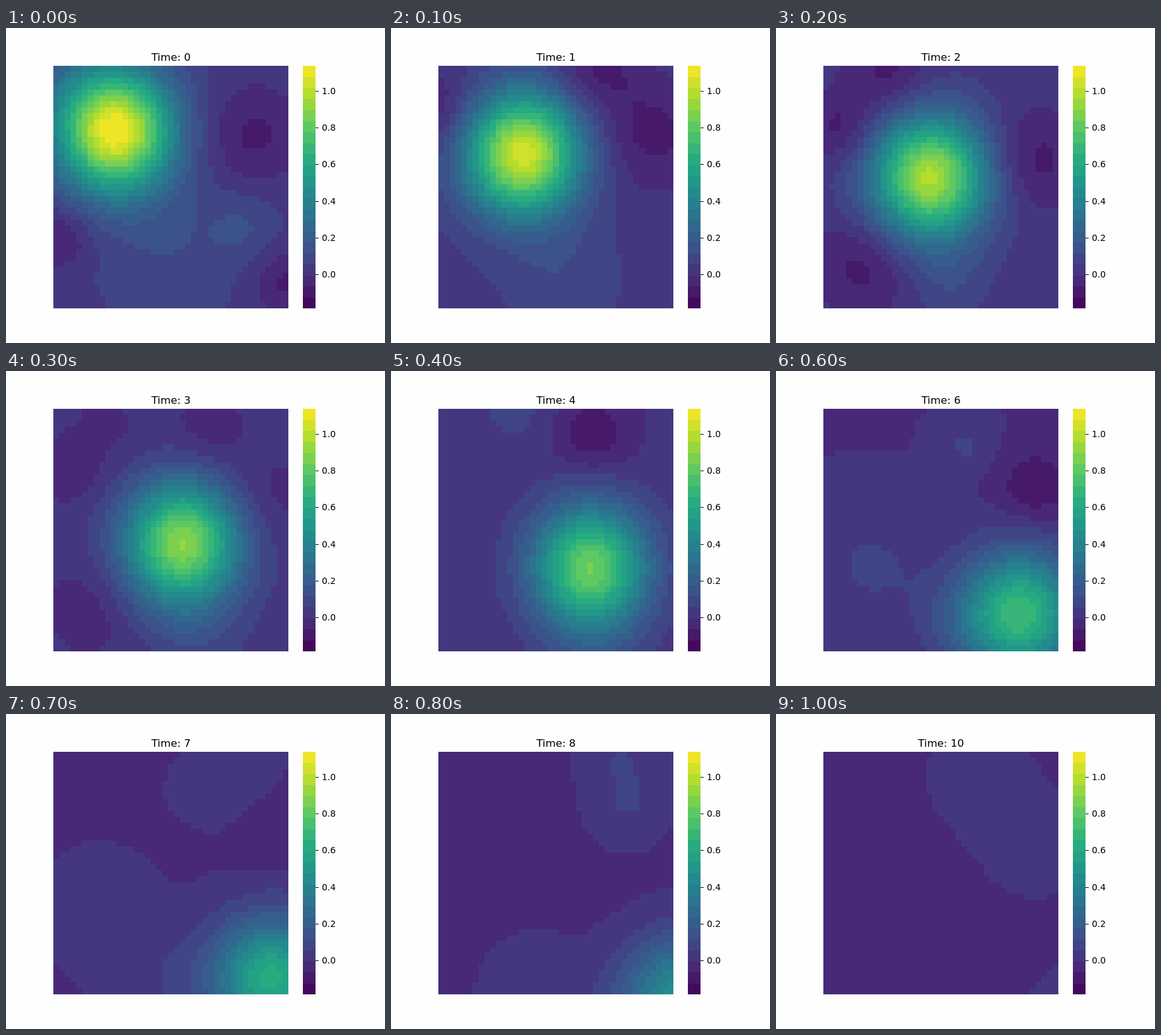
These frames come from a looping animation (600x500 px, 1100 ms). An HTML page with a canvas:

```html
<!DOCTYPE html>
<html lang="en">
<head>
<meta charset="utf-8">
<title>Heat map over time</title>
<style>
  html, body { margin: 0; width: 100%; height: 100%; overflow: hidden; background: #fefefe; }
  canvas, svg { position: absolute; left: 0; top: 0; display: block; }
  text { font-family: "DejaVu Sans", sans-serif; font-size: 13.89px; fill: #000; }
  #title { font-size: 16.67px; text-anchor: middle; }
</style>
</head>
<body>
<canvas id="map" width="600" height="500"></canvas>
<svg id="chart" width="600" height="500" viewBox="0 0 600 500">
  <text id="title" x="261.3" y="51.5">Time: 0</text>
</svg>
<script>
const STEP_MS = 100, STEPS = 11, CELLS = 41, BANDS = 22;
const PLOT = { x: 75, y: 60, w: 372, h: 385 };
const BAR = { x: 470, w: 20 };

const ctx = document.getElementById("map").getContext("2d");
const chart = document.getElementById("chart");
const title = document.getElementById("title");

// Viridis at even spacing, cut into flat bands.
const VIRIDIS = "440154 472d7b 3b528b 2c728e 21918c 28ae80 5ec962 addc30 fde725"
  .split(" ").map(hex => [0, 2, 4].map(i => parseInt(hex.slice(i, i + 2), 16)));

function viridis(u) {
  const pos = u * (VIRIDIS.length - 1);
  const i = Math.floor(pos);
  const mix = VIRIDIS[i].map((c, k) => Math.round(c + (VIRIDIS[i + 1][k] - c) * (pos - i)));
  return `rgb(${mix})`;
}

const bandColors = Array.from({ length: BANDS }, (_, i) => viridis((i + .5) / BANDS));

const valueToY = v => 391.3 - 291.4 * v;

function colorOf(value) {
  const band = Math.floor((PLOT.y + PLOT.h - valueToY(value)) / PLOT.h * BANDS);
  return bandColors[Math.max(0, Math.min(BANDS - 1, band))];
}

const bump = (x, y, cx, cy, rx, ry = rx) =>
  Math.exp(-(((x - cx) / rx) ** 2) - ((y - cy) / ry) ** 2);

// The hot spot drifts diagonally and cools exponentially.
const hotSpot = (step, x, y) =>
  1.1 * Math.exp(-.072 * step) * bump(x, y, 173 + 35.6 * step, 163 + 37 * step, 89, 95);

// Key spots [x, y, radius] of the slowly cooling background; steps between are blended.
const WARM = .07, COOL = -.12;
const SPOTS = {
  0: { warm: [[85, 85, 75], [260, 350, 110], [375, 315, 55]],
       cool: [[85, 330, 50], [390, 170, 80], [440, 405, 50]] },
  1: { warm: [[270, 400, 90]],
       cool: [[75, 130, 65], [325, 70, 65], [410, 170, 85]] },
  2: { warm: [[275, 400, 60]],
       cool: [[180, 75, 65], [105, 160, 55], [405, 210, 75], [140, 375, 75]] },
  4: { warm: [[195, 60, 60], [320, 430, 75]], cool: [[320, 100, 60]] },
  6: { warm: [[150, 310, 90], [285, 400, 70], [300, 120, 40]], cool: [[410, 185, 55]] },
  8: { warm: [[365, 60, 65], [375, 150, 60], [230, 440, 80]], cool: [[447, 450, 55]] },
  10: { warm: [[320, 100, 90], [410, 210, 90]], cool: [] }
};

function spotHeat(step, x, y) {
  if (!SPOTS[step]) return (spotHeat(step - 1, x, y) + spotHeat(step + 1, x, y)) / 2;
  const total = spots => spots.reduce((sum, spot) => sum + bump(x, y, ...spot), 0);
  return WARM * total(SPOTS[step].warm) + COOL * total(SPOTS[step].cool);
}

const heat = (step, x, y) =>
  .04 - .0075 * step + hotSpot(step, x, y) + spotHeat(step, x, y);

const cellX = i => Math.round(PLOT.x + i * PLOT.w / CELLS);
const cellY = j => Math.round(PLOT.y + j * PLOT.h / CELLS);

function draw(step) {
  for (let j = 0; j < CELLS; j++) {
    for (let i = 0; i < CELLS; i++) {
      const left = cellX(i), right = cellX(i + 1), top = cellY(j), bottom = cellY(j + 1);
      ctx.fillStyle = colorOf(heat(step, (left + right) / 2, (top + bottom) / 2));
      ctx.fillRect(left, top, right - left, bottom - top);
    }
  }
  title.textContent = `Time: ${step}`;
}

function add(tag, attrs, text = "") {
  const node = document.createElementNS("http://www.w3.org/2000/svg", tag);
  for (const key in attrs) node.setAttribute(key, attrs[key]);
  node.textContent = text;
  chart.append(node);
}

bandColors.forEach((fill, i) => {
  const height = PLOT.h / BANDS;
  add("rect", { x: BAR.x, y: PLOT.y + PLOT.h - (i + 1) * height, width: BAR.w, height, fill,
                "shape-rendering": "crispEdges" });
});
for (let k = 0; k <= 5; k++) {
  const y = Math.round(valueToY(k / 5));
  add("path", { d: `M490 ${y + .5}h5`, stroke: "#000" });
  add("text", { x: 500, y: y + 5 }, (k / 5).toFixed(1));
}

let shown = -1;
function tick(now) {
  const step = Math.floor(now / STEP_MS) % STEPS;
  if (step !== shown) draw(shown = step);
  requestAnimationFrame(tick);
}
draw(0);
requestAnimationFrame(tick);
</script>
</body>
</html>
```
